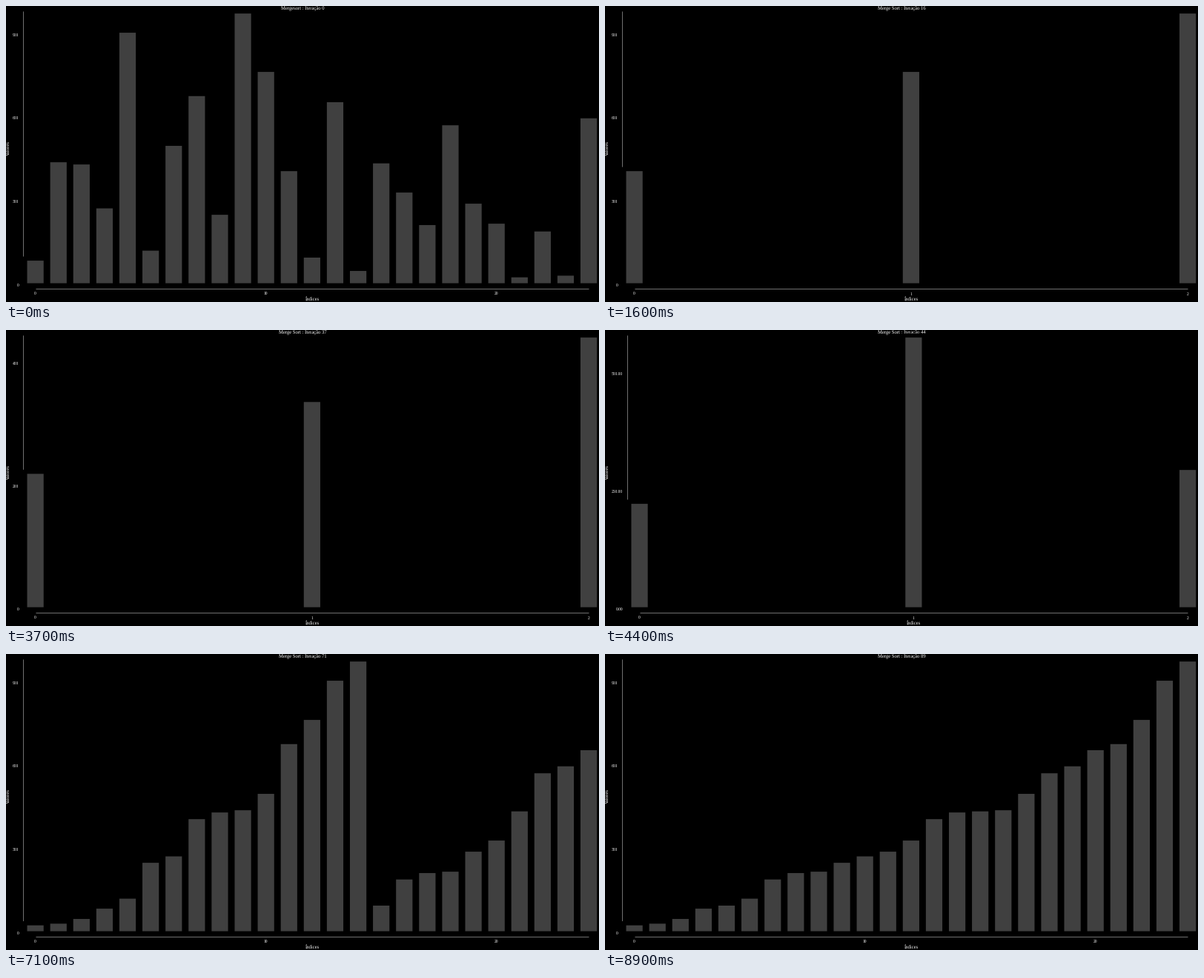
Recreate the animation shown at these times as a matplotlib script. Size 800 px wide and 400 px high, loop 9000 ms.

```python
from itertools import product

import matplotlib.pyplot as plt
import numpy as np
from matplotlib.animation import FuncAnimation

plt.rcParams["font.family"] = "Liberation Serif"
plt.rcParams["text.hinting"] = "none"

W, H, DPI = 800, 400, 40
PT = DPI / 72                       # pixels per point
TOP, BASE, AXIS_Y = 7.4, 377.4, 381.5
BAR = 50 * PT
RIGHT = W - BAR / 2
EM = 10 * PT                        # tick label size in pixels

VALUES = [96, 450, 442, 284, 916, 132, 509, 688, 261, 985, 775, 418, 107,
          666, 59, 446, 341, 224, 583, 301, 229, 36, 201, 42, 608]


def merge_sort(items, steps):
    """Sort items, recording the merged slice after every comparison."""
    mid = len(items) // 2
    if not mid:
        return items
    left, right = (merge_sort(part, steps) for part in (items[:mid], items[mid:]))
    done = []
    while left and right:
        done.append((left if left[0] <= right[0] else right).pop(0))
        steps.append(done + left + right)
    return done + left + right


def ticks(top):
    """Best labelling of 0..top, scored by simplicity, coverage and density."""
    best, pick = -9, None
    nice = enumerate((1, 5, 2, 2.5, 4, 3))
    for skip, (rank, q), n, mag in product((1, 2), nice, range(1, 7), range(-1, 3)):
        step = skip * q * 10.0 ** mag
        if n * step > top + 1e-9:
            continue
        simple = 2 - rank / 5 - skip
        cover = 1 - 50 * (1 - n * step / top) ** 2
        ratio = top / (2 * step)
        dense = 2 - max(ratio, 1 / ratio)
        score = 0.25 * simple + 0.2 * cover + 0.5 * dense
        if score > best + 1e-9:
            digits = max(0 if q == int(q) else 2, -mag)
            best, pick = score, (step, n, digits)
    step, n, digits = pick
    return [(k * step, f"{k * step:.{digits}f}") for k in range(n + 1)]


def label_width(text):
    return EM * sum(0.25 if c == "." else 0.5 for c in text)


steps = [VALUES]
merge_sort(VALUES, steps)

fig = plt.figure(figsize=(W / DPI, H / DPI), dpi=DPI, facecolor="black")
ax = fig.add_axes([0, 0, 1, 1])


def write(x, y, text, size=12, ha="center", **kw):
    ax.text(x, y, text, size=size, ha=ha, va="baseline", color="white",
            zorder=1, **kw)


def rule(xs, ys):
    ax.plot(xs, ys, color="#707070", lw=1 / PT, solid_capstyle="butt", zorder=1)


def draw(i):
    ax.clear()
    ax.axis("off")
    ax.set(xlim=(0, W), ylim=(H, 0))

    data = steps[i]
    last, peak = len(data) - 1, max(data)
    scale = (BASE - TOP) / peak
    y_ticks = ticks(peak)
    axis_x = 8.8 + max(label_width(t) for _, t in y_ticks) + 10.5 * PT
    left = axis_x + 5 * PT + BAR / 2

    write(W / 2, 5, f"{'Merge Sort' if i else 'Mergesort'} : Iteração {i}")
    write((left + RIGHT) / 2, 398.2, "Índices")
    write(5.2, (TOP + BASE) / 2, "Valores", rotation=90, rotation_mode="anchor")

    rule([axis_x, axis_x], [TOP, BASE])
    rule([left, RIGHT], [AXIS_Y, AXIS_Y])
    for v, text in y_ticks:
        write(axis_x - 10.5 * PT, BASE - v * scale + 2.2, text, 10, "right")
    for v, text in ticks(last):
        write(left + v * (RIGHT - left) / last, 390.9, text, 10)

    # The thick black outlines also cover part of the title.
    ax.bar(np.linspace(left, RIGHT, last + 1), -scale * np.array(data), BAR,
           bottom=BASE, color="#404040", edgecolor="black", linewidth=10,
           snap=False, zorder=2)
    return []


anim = FuncAnimation(fig, draw, frames=len(steps), init_func=lambda: [],
                     interval=100, repeat=True, repeat_delay=0)
plt.show()
```
